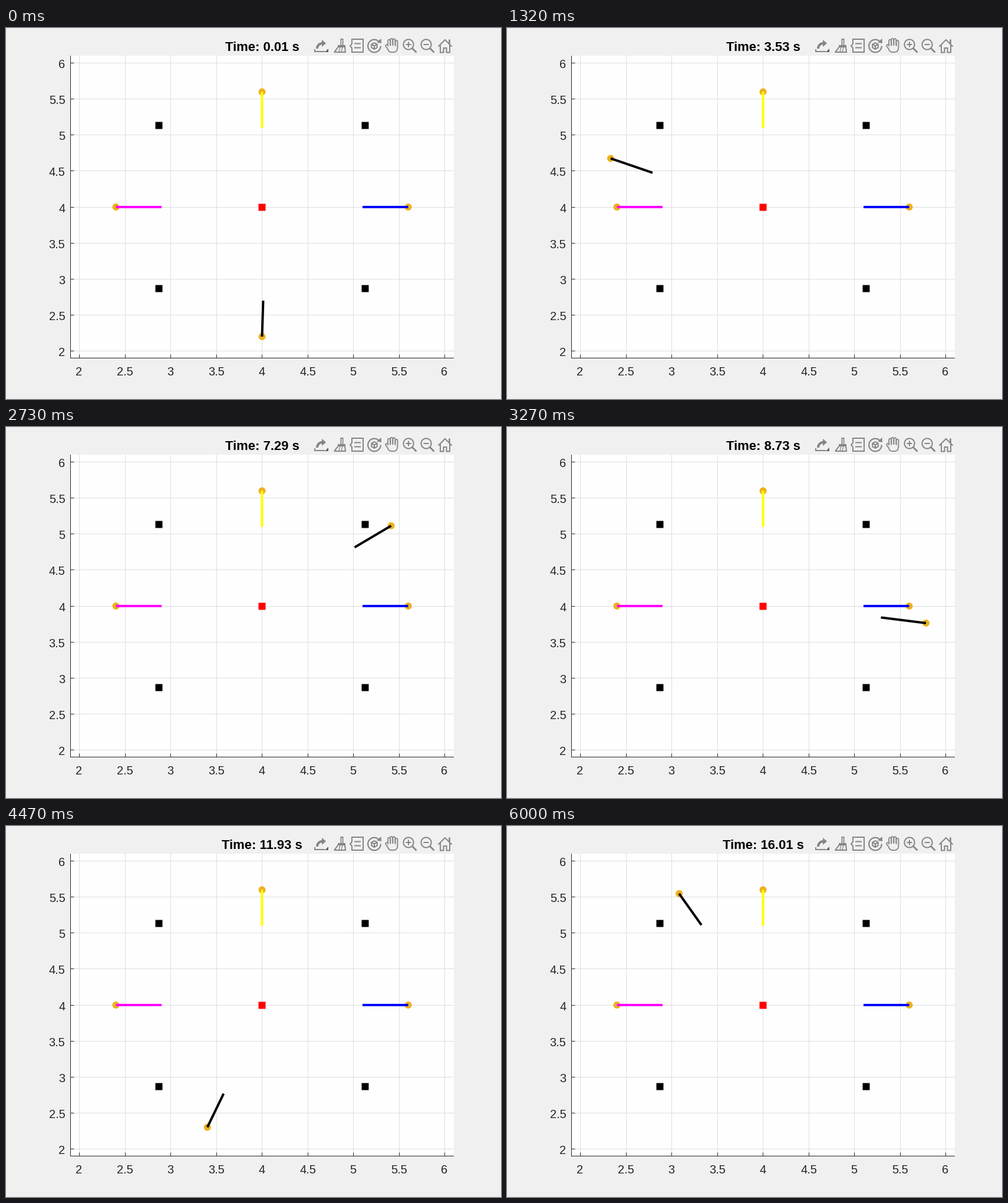
Recreate the animation shown at these times as a matplotlib script. Size 840 by 630 pixels, loop 6.03 s.

```python
import numpy as np
import matplotlib.pyplot as plt
from matplotlib.animation import FuncAnimation
from matplotlib.patches import Circle, Rectangle

W, H, DPI = 840, 630, 100
PT = 72 / DPI
FRAMES, STEP_MS = 201, 30
DT = 0.08            # simulated seconds per frame
RADIUS, SPEED = 1.8, 1.0
LEAD = 0.025         # the bar points slightly ahead of the centre
LENGTH = 0.5
PAPER, INK, ICON, GOLD = "#f0f0f0", "#262626", "#858585", "#edb120"
LEFT, RIGHT, TOP, BOTTOM = 109, 760, 47, 561
ICON_Y = 30

plt.rcParams["font.family"] = "Liberation Sans"
fig = plt.figure(figsize=(W / DPI, H / DPI), dpi=DPI, facecolor=PAPER)
ax = fig.add_axes([0, 0, 1, 1])
ax.set_xlim(0, W)
ax.set_ylim(H, 0)
ax.axis("off")


def to_px(x, y):
    return 434.5 + 155 * (x - 4), 304.03 - 122.25 * (y - 4)


def polar(r, a):
    return r * np.cos(a), r * np.sin(a)


def line(xs, ys, color, width, **kw):
    kw = {"solid_capstyle": "butt", "solid_joinstyle": "miter", "snap": False, **kw}
    return ax.plot(xs, ys, color=color, lw=width * PT, **kw)[0]


def dot(x, y):
    return ax.add_patch(Circle(to_px(x, y), 6, fc=GOLD, lw=0, zorder=4))


def square(x, y, color):
    px, py = (int(p) + 0.5 for p in to_px(x, y))
    ax.add_patch(Rectangle((px - 6, py - 6), 12, 12, fc=color, lw=0,
                           snap=False, zorder=3))


def bar(x, y, dx, dy, color, zorder=5):
    xs, ys = zip(to_px(x, y), to_px(x + dx, y + dy))
    return line(xs, ys, color, 4, zorder=zorder)


def label(x, y, text, **kw):
    kw = {"size": 20 * PT, "color": INK, "ha": "center", **kw}
    return ax.text(x, y, text, va="baseline", **kw)


def draw_axes():
    ax.add_patch(Rectangle((LEFT, TOP), RIGHT - LEFT, BOTTOM - TOP,
                           fc="#fefefe", lw=0, zorder=0))
    for v in np.arange(2, 6.5, 0.5):
        px, py = (int(p) + 0.5 for p in to_px(v, v))
        line([px, px], [TOP, BOTTOM - 1], "#dedede", 1, zorder=1)
        line([LEFT + 1, RIGHT], [py, py], "#dedede", 1, zorder=1)
        line([px, px], [BOTTOM - 6.5, BOTTOM], INK, 1)
        line([LEFT, LEFT + 6.5], [py, py], INK, 1)
        label(px - 0.5, 590, f"{v:g}")
        label(100.5, py + 8.3, f"{v:g}", ha="right")
    line([LEFT + 0.5] * 2, [TOP, BOTTOM], INK, 1)
    line([LEFT, RIGHT], [BOTTOM - 0.5] * 2, INK, 1)


# Toolbar icons: offsets are relative to the icon's centre.

def stroke(cx, xs, ys, width=2, color=ICON, **kw):
    line(cx + np.array(xs), ICON_Y + np.array(ys), color, width, **kw)


def triangle(cx, xs, ys, color=ICON):
    ax.fill(cx + np.array(xs), ICON_Y + np.array(ys), fc=color, lw=0, zorder=2)


def arc(cx, dx, dy, r, start=0, end=360, width=2):
    xs, ys = polar(r, np.radians(np.linspace(start, end, 60)))
    stroke(cx, dx + xs, dy + ys, width)


def export(cx):
    arc(cx, 2, 5, 9, 180, 270, 4)
    triangle(cx, [1, 8, 1], [-10, -4, 2])
    stroke(cx, [-11, -11, 6], [6, 10, 10])
    triangle(cx, [6, 12, 12], [11, 11, 5], "#606060")


def brush(cx):
    stroke(cx, [5, 5], [-12, -1], 5)
    stroke(cx, [5, 5], [-10, -1], 1.5, PAPER)
    stroke(cx, [-2, 11], [1, 1], 4)
    stroke(cx, [-1, -8, 11, 10], [2, 11, 11, 2])
    for dx in (2, 6):
        stroke(cx, [dx, dx - 2], [2, 11], 1.3)


def datatip(cx):
    stroke(cx, [-8, -8, 11, 11, -8, -8, -11, -8], [-3, -11, -11, 11, 11, 4, 0.5, -3])
    for dy in (-3.5, 3.5):
        stroke(cx, [-4, 7], [dy, dy])


def rotate(cx):
    arc(cx, 0, 0.5, 10.8, 0, 310, 2.2)
    triangle(cx, [4, 12, 11.5], [-5.5, -4, -12])
    xs, ys = polar(5.5, np.radians(np.arange(-90, 300, 60)))
    stroke(cx, xs, ys + 0.5)
    for k in (1, 3, 5):
        stroke(cx, [0, xs[k]], [0.5, ys[k] + 0.5])


def hand(cx):
    for color, cut in ((ICON, 0), (PAPER, 3.6)):
        style = {"color": color, "solid_capstyle": "round"}
        for k in range(4):
            tip = -10.4 + 1.1 * (k - 1.3) ** 2
            stroke(cx, [-5 + 4.2 * k] * 2, [tip, 3], 5.6 - cut, **style)
        stroke(cx, [-9, -4], [0, 7], 5.6 - cut, **style)
        stroke(cx, [-1, 3], [5, 5], 14 - cut, **style)


def zoom_out(cx):
    arc(cx, -2, -2, 8.6)
    stroke(cx, [4, 11.5], [4, 11.5], 2.8)
    stroke(cx, [-6.5, 2.5], [-2, -2])


def zoom_in(cx):
    zoom_out(cx)
    stroke(cx, [-2, -2], [-6.5, 2.5])


def home(cx):
    stroke(cx, [-11.5, 0, 11.5], [1.5, -10, 1.5])
    for s in (-1, 1):
        stroke(cx, [8 * s, 8 * s, 2.5 * s, 2.5 * s, 0], [-1, 11.5, 11.5, 4, 4])
    stroke(cx, [7.5, 7.5], [-10.5, -3], 2.6)


draw_axes()
for k, icon in enumerate((export, brush, datatip, rotate,
                          hand, zoom_in, zoom_out, home)):
    icon(535 + 30 * k)

d = 1.6 / np.sqrt(2)
for sx in (-1, 1):
    for sy in (-1, 1):
        square(4 + sx * d, 4 + sy * d, "black")
square(4, 4, "red")

for k, color in enumerate(("blue", "yellow", "magenta")):
    ux, uy = polar(1, k * np.pi / 2)
    x, y = 4 + 1.6 * ux, 4 + 1.6 * uy
    dot(x, y)
    bar(x, y, -LENGTH * ux, -LENGTH * uy, color)

robot = dot(4, 4 - RADIUS)
pointer = bar(4, 4 - RADIUS, 0, LENGTH, "black", zorder=6)
title = label(434.7, 39, "", size=22 * PT, color="black", weight="bold")


def update(i):
    t = i * DT
    a = -np.pi / 2 - SPEED * t / RADIUS
    dx, dy = polar(RADIUS, a)
    bx, by = polar(LENGTH, a + np.pi - LEAD)
    robot.center = to_px(4 + dx, 4 + dy)
    pointer.set_data(*zip(robot.center, to_px(4 + dx + bx, 4 + dy + by)))
    title.set_text(f"Time: {t + 0.01:.2f} s")
    return robot, pointer, title


anim = FuncAnimation(fig, update, frames=FRAMES, interval=STEP_MS,
                     repeat=True, repeat_delay=0)
plt.show()
```
